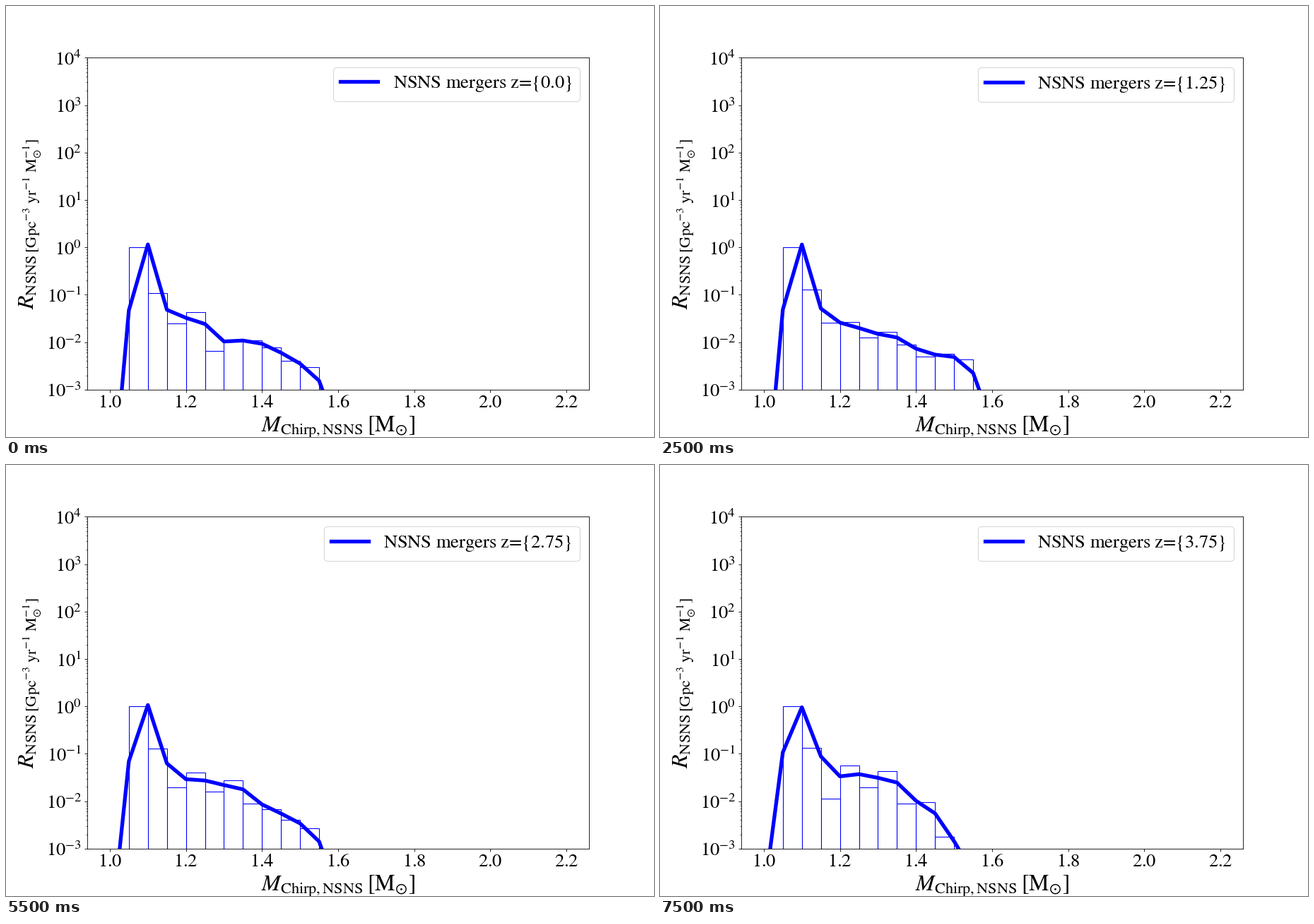
Write a matplotlib script that moves like this. It is 917 px wide and 611 px high and loops after 8 s.

```python
import numpy as np
import matplotlib.pyplot as plt
from matplotlib.animation import FuncAnimation
from matplotlib.ticker import FuncFormatter, LogLocator, MultipleLocator, NullFormatter

W, H, DPI = 917, 611, 76.4
FRAMES, INTERVAL, DZ = 16, 500, 0.25
Z_KNEE, Z_END = 0.75, 3.75
BIN, FLOOR = 0.05, 1e-6

plt.rcParams.update({
    "font.family": "Liberation Serif",
    "mathtext.fontset": "stix",
    "font.size": 25,
})

# Tail bins from 1.10 on, in units of 1e-3: at z=0, at the knee, at the end
START = np.array([110, 25, 43, 6.5, 11.3, 11, 7.8, 4, 3])
KNEE = np.array([128, 26, 26, 12.5, 16, 9, 4.8, 5.9, 4.5])
END = np.array([131, 11.3, 56.6, 19.6, 42.3, 8.9, 9.4, 1.8, 0.5])


def tail(z):
    """Linear change up to the knee, then a quadratic ease-in."""
    if z < Z_KNEE:
        rate = START + (KNEE - START) * z / Z_KNEE
    else:
        rate = KNEE + (END - KNEE) * ((z - Z_KNEE) / (Z_END - Z_KNEE)) ** 2
    return rate * 1e-3


def density(z):
    """Gaussian peak that widens with redshift, plus the smoothed tail."""
    sigma = 0.0187 + 0.004 * (z / Z_END) ** 3
    peak = 0.0215 / sigma * np.exp(-((masses - 1.0975) / sigma) ** 2 / 2)
    bins = tail(z)
    bins[0] *= 0.25  # most of this bin belongs to the peak
    peak[1:] += np.convolve(bins, [0.04, 0.46, 0.46, 0.04])
    return peak


def roman(text):
    return rf"$\mathrm{{{text}}}$"


def label(z):
    # Negative space cancels the padding around the equals sign.
    return roman(rf"NSNS\ mergers\ z\hspace{{-0.2}}=\hspace{{-0.2}}\{{{z}\}}")


# The tiny margin keeps the pixel size from truncating downwards.
fig, ax = plt.subplots(figsize=((W + 1e-6) / DPI, (H + 1e-6) / DPI), dpi=DPI)
fig.patch.set_facecolor("white")
fig.subplots_adjust(left=0.125, right=0.9, bottom=0.11, top=0.88)

masses = 1.0 + BIN * np.arange(13)
bars = ax.bar(masses[1:11], np.ones(10), width=BIN, align="edge",
              bottom=FLOOR, fill=False, edgecolor="blue", linewidth=1)
line, = ax.plot(masses, density(0), color="blue", lw=5, label=label(0.0),
                solid_joinstyle="round")

ax.set_yscale("log")
ax.set_xlim(0.94, 2.26)
ax.set_ylim(1e-3, 1e4)
ax.xaxis.set_major_locator(MultipleLocator(0.2))
ax.xaxis.set_major_formatter(FuncFormatter(lambda x, _: roman(f"{x:.1f}")))
ax.yaxis.set_major_locator(LogLocator(numticks=20))
ax.yaxis.set_major_formatter(
    FuncFormatter(lambda y, _: roman(f"10^{{{round(np.log10(y))}}}")))
ax.yaxis.set_minor_locator(LogLocator(subs=range(2, 10), numticks=20))
ax.yaxis.set_minor_formatter(NullFormatter())
ax.tick_params(axis="x", pad=4.7)

fig.text(470.5 / W, 1 - 604 / H,
         r"$M_{\mathrm{Chirp,NSNS}}\mathrm{\>[M_{\odot}]}$",
         size=30, ha="center", va="baseline")
fig.text(39.5 / W, 1 - 309 / H,
         r"$R_{\mathrm{NSNS\>[Gpc^{-3}\ yr^{-1}\ M_{\odot}^{-1}]}}$",
         size=30, rotation=90, rotation_mode="anchor",
         ha="center", va="baseline")
legend = ax.legend(loc="upper right")


def draw(i):
    z = i * DZ
    for bar, rate in zip(bars, [1.0, *tail(z)]):
        bar.set_height(rate - FLOOR)
    line.set_ydata(density(z))
    legend.get_texts()[0].set_text(label(z))
    return [*bars, line, legend]


anim = FuncAnimation(fig, draw, frames=FRAMES, interval=INTERVAL,
                     repeat=True, repeat_delay=0, blit=False)
plt.show()
```
